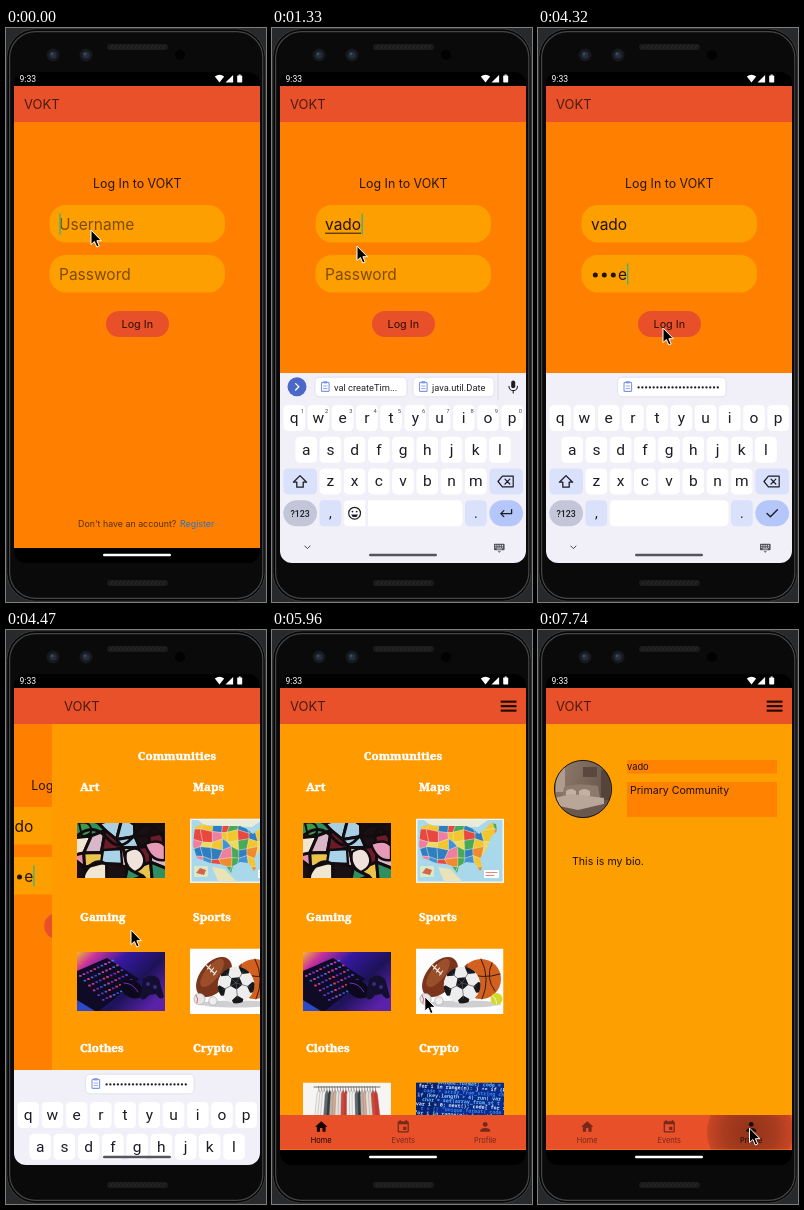
Animation, 260 px wide and 574 px high, one loop 8000 ms. Source, as an HTML page:

```html
<!DOCTYPE html>
<html lang="en">
<head>
<meta charset="utf-8">
<title>Phone app demo</title>
<style>
html, body { margin: 0; width: 100%; height: 100%; overflow: hidden; background: #28292b; }
svg { display: block; width: 260px; height: 574px; }
text { white-space: pre; }
.app { font-family: Inter, sans-serif; }
.key { font-family: Roboto, sans-serif; }
.slab { font-family: "Noto Serif", serif; font-weight: 900; stroke: #fff; stroke-width: .45; }
.mono { font-family: "Noto Sans Mono", monospace; }
</style>
</head>
<body>
<svg id="stage" viewBox="0 0 260 574" xmlns="http://www.w3.org/2000/svg"></svg>
<script>
const APP = 'VOKT', USER = 'vado', PASS = 'vade';
const LOOP = 8000, STEP = 149;

// ---- markup helpers
const rect = (x, y, w, h, fill, r = 0, more = '') =>
  `<rect x="${x}" y="${y}" width="${w}" height="${h}" rx="${r}" fill="${fill}" ${more}/>`;
const circ = (x, y, r, fill, more = '') => `<circle cx="${x}" cy="${y}" r="${r}" fill="${fill}" ${more}/>`;
const path = (d, fill = 'none', more = '') => `<path d="${d}" fill="${fill}" ${more}/>`;
const line = (d, color, w = 1, more = '') =>
  path(d, 'none', `stroke="${color}" stroke-width="${w}" stroke-linecap="round" stroke-linejoin="round" ${more}`);
const text = (x, y, s, size, fill, cls = 'app', more = '') =>
  `<text x="${x}" y="${y}" font-size="${size}" fill="${fill}" class="${cls}" ${more}>${s}</text>`;
const mid = 'text-anchor="middle"';
const group = (id, body, more = '') => `<g id="${id}" ${more}>${body}</g>`;
const clip = (id, shape) => `<clipPath id="${id}">${shape}</clipPath>`;
const times = (n, fn) => Array.from({ length: n }, (_, i) => fn(i)).join('');

function random(seed) {
  return () => (seed = (seed * 16807) % 2147483647) / 2147483647;
}

// Patchwork of skewed cells that share their corners
function patches(x, y, w, h, cols, rows, colors, stroke, width, seed, wobble) {
  const rnd = random(seed), pts = [];
  for (let j = 0; j <= rows; j++) for (let i = 0; i <= cols; i++)
    pts.push([x + w * (i + (rnd() - .5) * wobble) / cols, y + h * (j + (rnd() - .5) * wobble) / rows]);
  const at = (i, j) => pts[j * (cols + 1) + i].map(v => v.toFixed(1)).join(' ');
  return times(cols * rows, k => {
    const i = k % cols, j = k / cols | 0;
    const d = `M${at(i, j)}L${at(i + 1, j)}L${at(i + 1, j + 1)}L${at(i, j + 1)}z`;
    return path(d, colors[Math.floor(rnd() * colors.length)], `stroke="${stroke}" stroke-width="${width}" stroke-linejoin="round"`);
  });
}

// ---- phone body
function phone() {
  const speaker = y => rect(101, y, 61, 6, '#1b1b1b', 3) +
    times(14, i => line(`M${104 + i * 4} ${y + 4.5}l2.5 -3`, '#303030', .8));
  const lens = x => circ(x, 27, 6.5, '#16191d') + circ(x, 27, 3.6, '#252d38') + circ(x - 1, 26, 1.4, '#3d4a5c');
  return rect(0, 0, 260, 574, '#28292b') +
    rect(.8, .8, 258.4, 572.4, '#060606', 29, 'stroke="#3a3b3c" stroke-width="1"') +
    rect(3.6, 3.6, 253.2, 566.8, '#0a0a0a', 26, 'stroke="#454648" stroke-width="1.2"') +
    speaker(16) + speaker(552) + lens(47) + lens(80) + circ(174, 27, 5, '#020202') +
    rect(8, 44, 246, 491, '#000', 12);
}

function statusBar() {
  return text(13.5, 54, '9:33', 8.6, '#fff', 'key') +
    path('M213.5 54.5L208.8 48.6Q213.5 45 218.2 48.6z', '#fff') +
    path('M219.5 54.5h7.6v-7.6z', '#fff') +
    rect(231.2, 47.4, 5, 7.2, '#fff', .8) + rect(232.7, 46.5, 2, 1.2, '#fff');
}

const title = () => text(18, 81, APP, 13, '#4b1b10');

// ---- login screen
function login() {
  const field = y => rect(43.5, y, 175.5, 37.4, '#fe9f00', 16.5);
  return rect(8, 94, 246, 426, '#ff8000') + title() +
    text(131.3, 160.3, 'Log In to ' + APP, 12.4, '#2b1503', 'app', mid) +
    field(177) + field(227) +
    text(53, 202, '', 15.5, '#7d4c00', 'app', 'id="user"') +
    line('M53 205.2h0', '#231500', 1, 'id="under"') +
    group('dots', '') +
    text(53, 252, '', 15.5, '#7d4c00', 'app', 'id="pass"') +
    rect(0, 0, 1.3, 21, '#2fb58a', 0, 'id="caret"') +
    rect(100, 283, 63, 26, '#e8502a', 13) +
    text(131.3, 300, 'Log In', 10.8, '#2d0d04', 'app', mid) +
    text(72, 499.3, "Don't have an account?", 8.85, '#54300a') +
    text(174, 499.3, 'Register', 8.9, '#2a72c4');
}

// ---- keyboard
function keyboard() {
  const ink = '#1c1d24', tint = '#dae1fb';
  const key = (x, y, w, fill = '#fff', r = 4.5) => rect(x, y, w, 26, fill, r);
  const row = (s, x, y) => [...s].map((c, i) => {
    const cx = x + i * 24.22;
    return key(cx - 10.8, y, 21.6) + text(cx, y + 17.8, c, 15.5, ink, 'key', mid);
  }).join('');
  const board = x => rect(x, 354.4, 7.6, 9, '#fff', 1, 'stroke="#7f95e8" stroke-width="1.1"') +
    rect(x + 2, 353.2, 3.6, 2.2, '#7f95e8') + line(`M${x + 2} 358h3.6M${x + 2} 360.5h3.6`, '#7f95e8', .8);
  const chip = (x, w) => rect(x, 349.2, w, 19.6, '#fff', 4.5, 'stroke="#dcdde6" stroke-width=".8"');
  return rect(8, 345, 246, 190, '#f1eff7') +
    group('strip',
      circ(25, 358.8, 9.5, '#4b68c9') + line('M23.6 355.6l3.2 3.2l-3.2 3.2', '#fff', 1.3) +
      chip(43, 92) + board(49.5) + text(62, 362.6, 'val createTim...', 9.3, ink, 'key') +
      chip(141, 81) + board(147.5) + text(160, 362.6, 'java.util.Date', 9.3, ink, 'key') +
      line('M226 346v26', '#d9d8e0', .8) +
      rect(239.2, 352.6, 4, 7.6, ink, 2) + line('M237 358.4a4.2 4.2 0 0 0 8.4 0M241.2 362.6v2.4', ink, 1.1)) +
    group('secret', chip(79.5, 108.5) + board(86) + times(22, i => circ(100.6 + i * 3.77, 359.4, 1.15, ink))) +
    row('qwertyuiop', 22.2, 377) + row('asdfghjkl', 34.2, 408.8) + row('zxcvbnm', 58.4, 440.4) +
    group('digits', times(10, i => text(30.5 + i * 24.22, 384.5, (i + 1) % 10, 5.8, '#45464f', 'key', mid))) +
    key(11.4, 440.4, 33.6, tint) + line('M28 447.6l-6.6 6.6h3.4v5h6.4v-5h3.4z', ink, 1.3) +
    key(217.4, 440.4, 33.6, tint) +
    line('M230.4 448.2h10.8v10.6h-10.8l-4.4 -5.3zM233 451.2l4.8 4.8M237.8 451.2l-4.8 4.8', ink, 1.2) +
    key(11.4, 472.2, 33.6, '#c3c5d8', 13) + text(28.2, 488.6, '?123', 8.8, ink, 'key', mid + ' font-weight="500"') +
    key(47.4, 472.2, 21.8, tint) + text(58.3, 490, ',', 14, ink, 'key', mid) +
    rect(71.8, 472.2, 118.6, 26, '#fff', 4.5) +
    group('smile', rect(93.4, 472, 2.6, 26.4, '#f1eff7') +
      circ(82.6, 485.2, 5.9, 'none', `stroke="${ink}" stroke-width="1.2"`) +
      circ(80.5, 483.6, .9, ink) + circ(84.7, 483.6, .9, ink) + path('M79.2 486.4h6.8a3.5 3.5 0 0 1-6.8 0z', ink)) +
    key(193, 472.2, 21.8, tint) + text(203.9, 490, '.', 14, ink, 'key', mid) +
    key(217.4, 472.2, 33.6, '#b5c6fb', 13) +
    group('enter', line('M239.6 481.6v4h-10.6M231.8 482.6l-3 3l3 3', ink, 1.3)) +
    group('check', line('M229 485.4l3.4 3.4l7 -7', ink, 1.4)) +
    line('M32.8 518l2.6 2.6l2.6 -2.6', '#44454d', 1) +
    rect(222, 515.8, 10.6, 6.4, '#55565e', .8) +
    times(8, i => rect(223.3 + i % 4 * 2.2, 517 + (i >> 2) * 1.7, 1.1, 1, '#f1eff7')) +
    rect(224.6, 520.5, 5.4, .8, '#f1eff7') + path('M225.6 523.2h3.4l-1.7 1.5z', '#55565e');
}

// ---- pictures on the home screen
function art() {
  const colors = ['#e9c34b', '#b52f3a', '#e58fb4', '#a8cfe4', '#f1e6d2', '#2f8f62', '#6b1a2a', '#1a1013', '#d9b7c9', '#1a1013'];
  return rect(31, 193, 88, 55, '#160f12') +
    patches(27, 189, 96, 63, 6, 4, colors, '#120c0f', 3, 77, .8) +
    path('M33 193q10 -2 12 5t-9 8z', '#3f9a4c', 'stroke="#120c0f" stroke-width="2"') +
    path('M57 220l18 -1l1 15l-21 -1z', '#a9d3e8', 'stroke="#120c0f" stroke-width="2.4"') +
    path('M80 222q12 -8 17 3t-8 17q-12 -6 -9 -20z', '#efe3dc', 'stroke="#120c0f" stroke-width="2.4"') +
    path('M99 214q14 -6 20 2v14q-14 2 -20 -16z', '#e79ab8', 'stroke="#120c0f" stroke-width="2.4"') +
    line('M31 206q16 -14 30 2t28 -4t30 6M36 248q10 -22 24 -14', '#120c0f', 3);
}

function map() {
  const colors = ['#e8483f', '#f2c72e', '#4aa957', '#ee7fa0', '#3f93d6', '#f08a2e', '#2f7fc0', '#f0da5a'];
  const land = 'M149 197l9 -3l3 2h33l7 3l6 5l5 -4l7 -7l5 1l1 7l-6 6l-3 8l-3 7l-5 6l2 10l-2 3l-5 -8l-9 -1l-7 4l-2 7l-5 -7l-6 -2l-10 -1l-13 -5l-4 -13z';
  return rect(144, 188.5, 88, 64.5, '#f3f6f5') + rect(145.5, 190, 85, 61.5, '#a9d8ea') +
    path('M152 190h64l-10 7l-48 -2z', '#e9ecd8') + path('M166 237l12 2l12 12h-18z', '#ebe3b8') +
    `<g clip-path="url(#land)">${patches(147, 192, 82, 54, 9, 6, colors, '#f0e6c8', .35, 41, .6)}</g>` +
    clip('land', path(land)) +
    rect(148, 236, 14, 11, '#d9e9c8', 1) + path('M150 243l4 -5l6 2l-2 5z', '#d5654a') +
    rect(212, 240, 15, 8, '#fff') + line('M214 242.5h11M214 245.5h8', '#d4554a', .7);
}

function gaming() {
  const rnd = random(9), neon = ['#e04bd0', '#5a4cf2', '#3f86ff', '#ff4a7a', '#8a38de'];
  return rect(31, 322, 88, 59, 'url(#neon)') +
    path('M31 341l30 -13l32 21l-40 32h-22z', '#0f0a26') +
    times(60, k => {
      const i = k % 10, j = k / 10 | 0;
      return rect((33 + i * 3.6 + j * 4.6).toFixed(1), (345 - i * 1.7 + j * 4.8).toFixed(1), 2.6, 1.8, neon[Math.floor(rnd() * 5)], .5, 'opacity=".8"');
    }) +
    path('M31 370l18 11h-18z', '#2b49c8') +
    `<ellipse cx="86" cy="359" rx="12" ry="8.5" fill="#0c091c" transform="rotate(28 86 359)"/>` +
    line('M78 353q9 0 14 9', '#6b2fc0', 1) +
    path('M97 349q9 -7 16 0l5 18q-4 4 -8 -3l-7 1q-6 8 -9 2z', '#140f30') +
    circ(102, 354, 2, '#3a2b7c') + circ(109, 357, 2, '#3a2b7c');
}

function sports() {
  const spot = (x, y, r, turn) => path(times(5, i => {
    const a = (turn + i * 72) * Math.PI / 180;
    return (i ? 'L' : 'M') + (x + r * Math.cos(a)).toFixed(1) + ' ' + (y + r * Math.sin(a)).toFixed(1);
  }) + 'z', '#17181b');
  return rect(144, 318.5, 87.5, 65.5, '#fdfdfd') +
    `<ellipse cx="191" cy="374" rx="38" ry="3.5" fill="#cfcfd2"/>` +
    circ(209, 349, 20, '#d2601f') + path('M196 333a20 20 0 0 0 -4 27z', '#8f3f14') +
    `<g transform="rotate(-52 168 347)"><ellipse cx="168" cy="347" rx="23" ry="14" fill="#7a351c"/>` +
    `<ellipse cx="170" cy="343" rx="17" ry="7" fill="#9a4f2a"/></g>` +
    line('M160 335l9 9M161.5 339l3 -4M164.5 342l3 -4M167.6 345l3 -4', '#f4ebe2', 1.1) +
    line('M209 329q10 20 1 40M192 342q18 8 36 2M220 333q-7 15 3 28', '#3a1a0b', 1) +
    `<g clip-path="url(#ball)">${circ(190, 355, 18.5, '#ededee')}${spot(190, 353, 6.6, -60)}` +
    times(5, i => {
      const a = (-60 + i * 72) * Math.PI / 180;
      return spot(190 + 17.5 * Math.cos(a), 354 + 17.5 * Math.sin(a), 6, 120 + i * 72) +
        line(`M190 353L${(190 + 14 * Math.cos(a)).toFixed(1)} ${(354 + 14 * Math.sin(a)).toFixed(1)}`, '#55565a', .7);
    }) + `</g>` + clip('ball', circ(190, 355, 18.5, '#000')) +
    circ(153.5, 369, 5.6, '#e6e6e7', 'stroke="#a8a8ab" stroke-width=".7"') + line('M150 365q3 4 1 8', '#d2483f', .8) +
    circ(167, 371, 4.2, '#efeff0', 'stroke="#a8a8ab" stroke-width=".7"') +
    circ(224.5, 369, 6, '#d2d92f') + line('M220.5 366q4 2 4 8', '#f5f6d8', .9);
}

function clothes() {
  const colors = ['#f3f1ee', '#dedad4', '#b9b2a8', '#f5f5f4', '#c8382f', '#e5e2dd', '#3a3a3d', '#efefee', '#cf463c', '#d7a88d', '#5e6b73'];
  return rect(31, 452.5, 88, 64, '#f6f5f4') + line('M42 457h66', '#6f6c6a', 1) +
    times(22, i => {
      const x = 45 + i * 2.7, lean = (i - 11) * .35;
      return line(`M${x + 1.5} 456.5l.6 5`, '#5c5a58', .6) +
        path(`M${x} 464l1.8 -4l2 4l${1 + lean} 40h-5z`, colors[i * 7 % 11], 'stroke="#77726d" stroke-width=".3"');
    });
}

function code() {
  const rows = ['t = [] "Unique.format(', 'for i in range(n): j +=', 'code = array_from_string', 'if (key.length > 4) run(', 'char = set(array_from_st', 'var i = 0; next(); code['];
  return rect(144, 452.5, 88, 64, '#0a2a8c') + rect(144, 452.5, 22, 64, '#061c62', 0, 'opacity=".6"') +
    `<g transform="rotate(3 188 470)">` + times(9, i =>
      text(141 + i * 5 % 11, 455 + i * 4.5, rows[i % 6] + ' ' + rows[(i + 2) % 6], 5, ['#6cc4ff', '#e2f4ff', '#3f8cf0', '#9fdcff'][i % 4], 'mono', 'font-weight="700"')) + `</g>`;
}

// ---- home and profile pages
function cards() {
  const pics = { Art: art, Maps: map, Gaming: gaming, Sports: sports, Clothes: clothes, Crypto: code };
  return Object.keys(pics).map((name, i) => {
    const x = i % 2 ? 144 : 31, row = i >> 1, y = [193, 188.5, 322, 318.5, 452.5, 452.5][i], h = [55, 64.5, 59, 65.5, 64, 64][i];
    return text(x + 3, 160.7 + row * 130.5, name, 11.6, '#fff', 'slab') +
      clip('pic' + i, rect(x, y, i === 3 ? 87.5 : 88, h, '#000')) +
      `<g clip-path="url(#pic${i})">${pics[name]()}</g>`;
  }).join('');
}

function profile() {
  return rect(8, 94, 246, 392, '#fe9f00') +
    clip('face', circ(45, 159, 28.6, '#000')) + `<g clip-path="url(#face)">` +
    rect(16, 130, 58, 58, 'url(#room)') + rect(18, 136, 9, 26, '#b09c8c') +
    rect(45, 137, 14, 10, '#5a483f') + rect(63, 140, 9, 30, '#54443b') +
    path('M26 157q12 -5 34 -1l2 12h-38z', '#8e7a6c') +
    path('M28 161q5 -4 10 0v5h-10zM41 161q5 -4 11 0v5h-11z', '#c2b0a2') +
    path('M16 168l18 -4l32 4v8l-28 6l-22 -6z', '#b8a698') + path('M16 175l24 5l34 -8v20h-58z', '#6a574d') +
    `</g>` + circ(45, 159, 28.6, 'none', 'stroke="#1c130c" stroke-width="1"') +
    rect(89, 130, 150, 13.5, '#ff8200') + text(89, 140, USER, 9.3, '#1d1002') +
    rect(89, 152, 150, 35, '#ff8200') + text(92, 164.4, 'Primary Community', 10.6, '#1d1002') +
    text(34, 235.4, 'This is my bio.', 10.6, '#1d1002');
}

const icons = [
  'M10 20v-6h4v6h5v-8h3L12 3 2 12h3v8z',
  'M17 12h-5v5h5zM16 1v2H8V1H6v2H5c-1.1 0-2 .9-2 2v14c0 1.1.9 2 2 2h14c1.1 0 2-.9 2-2V5c0-1.1-.9-2-2-2h-1V1zM19 19H5V8h14z',
  'M12 12c2.2 0 4-1.8 4-4s-1.8-4-4-4-4 1.8-4 4 1.8 4 4 4zM12 14c-2.7 0-8 1.3-8 4v2h16v-2c0-2.7-5.3-4-8-4z'
];

// The page is drawn wider than the screen on the right, so it covers it while it slides in
function main() {
  const tab = (name, i) => {
    const x = 49.2 + i * 82;
    return group('tab' + i, `<g transform="translate(${x - 7.4} 489.4) scale(.62)"><path fill-rule="evenodd" d="${icons[i]}"/></g>` +
      text(x, 513, name, 7.4, 'currentFill', 'app', mid).replace('fill="currentFill"', ''));
  };
  return rect(6, 94, 248, 426, '#ff9a00') + title() +
    times(3, i => rect(228.7, 70.6 + i * 4.5, 15.8, 2.1, '#1b0a06')) +
    group('home', text(131, 130.3, 'Communities', 11.6, '#fff', 'slab', mid) + cards()) +
    group('profile', profile()) +
    rect(6, 485, 248, 34.6, '#e8502a') + ['Home', 'Events', 'Profile'].map(tab).join('') +
    clip('bar', rect(8, 485, 246, 34.6, '#000')) +
    `<g clip-path="url(#bar)">${circ(212, 502, 0, 'url(#press)', 'id="ripple"')}</g>`;
}

const stage = document.getElementById('stage');
stage.innerHTML = `<defs>
  <linearGradient id="neon" x2="1" y2=".7"><stop stop-color="#f0b43a"/><stop offset=".16" stop-color="#c9329c"/><stop offset=".4" stop-color="#3418a0"/><stop offset=".7" stop-color="#1d1358"/><stop offset="1" stop-color="#5a22a8"/></linearGradient>
  <linearGradient id="room" x2="1" y2=".4"><stop stop-color="#94806f"/><stop offset="1" stop-color="#65544a"/></linearGradient>
  <radialGradient id="press"><stop stop-color="#2a1208" stop-opacity=".46"/><stop offset=".6" stop-color="#2a1208" stop-opacity=".34"/><stop offset="1" stop-color="#2a1208" stop-opacity=".16"/></radialGradient>
  ${clip('screen', rect(8, 44, 246, 491, '#000', 12))}</defs>` +
  phone() + `<g clip-path="url(#screen)">` + statusBar() +
  rect(8, 58, 246, 36, '#e8512a') +
  group('login', login()) + group('main', main()) + group('keys', keyboard()) +
  rect(97, 525.8, 68, 2.5, '#fff', 1.25, 'id="handle"') + `</g>` +
  group('mouse', path('M0 0V14.6L3.4 11.5L5.8 17L8.2 16L5.9 10.7H10.4z', '#000', 'stroke="#fff" stroke-width="1" stroke-linejoin="round"'));

const el = {};
stage.querySelectorAll('[id]').forEach(e => el[e.id] = e);
const set = (id, name, value) => el[id].setAttribute(name, value);
const show = (id, on) => set(id, 'display', on ? 'inline' : 'none');
const move = (id, x, y) => set(id, 'transform', `translate(${x} ${y})`);
const clamp = v => Math.max(0, Math.min(1, v));

// ---- motion, by step n
function mouseAt(n) {
  const down = clamp((n - 8) / 3), toButton = clamp((n - 22) / 6);
  const toTab = 1 - Math.pow(1 - clamp((n - 39) / 6), 2.5), last = clamp((n - 46) / 2);
  const b = toButton * toButton * (3 - 2 * toButton);
  return [85 + 40 * b + 76 * toTab + 10.5 * last,
    202 + 36 * (1 - Math.pow(1 - down, 1.45)) + 62 * b + 182 * toTab + 16 * last];
}

function typing(n) {
  const onPass = n >= 12;
  const user = USER.slice(0, clamp((n - 3) / 4) * 4);
  const count = n < 15 ? 0 : n < 19 ? Math.min(3, n - 14) : 4;
  el.user.textContent = user || 'Username';
  set('user', 'fill', user ? '#231500' : '#7d4c00');
  const wide = user ? el.user.getComputedTextLength() : 0;
  show('under', user && !onPass);
  set('under', 'd', `M53.5 205.2h${Math.max(0, wide - 1)}`);

  const hidden = Math.max(0, count - 1), x = 53 + hidden * 9;
  el.dots.innerHTML = times(hidden, i => circ(57.3 + i * 9, 247, 2.5, '#231500'));
  el.pass.textContent = count ? PASS[count - 1] : 'Password';
  set('pass', 'x', x);
  set('pass', 'fill', count ? '#231500' : '#7d4c00');
  const end = onPass ? (count ? x + el.pass.getComputedTextLength() : 53.4) : 53.4 + wide;
  set('caret', 'x', end);
  set('caret', 'y', onPass ? 235.5 : 185.5);
}

function draw(n) {
  typing(n);

  const inMain = n >= 30, slide = n < 33 ? 40 * Math.pow(.035, n - 30) : 0;
  show('login', n < 31);
  move('login', inMain ? -(246 - slide) * .3 : 0, 0);
  show('main', inMain);
  move('main', inMain ? slide : 0, 0);

  const rise = n < 4 ? 190 * Math.pow(1 - n / 3, 2) : n === 30 ? 95 : 0;
  const open = n > 0 && n < 31, secret = n >= 12;
  show('keys', open);
  move('keys', 0, rise);
  ['strip', 'digits', 'smile', 'enter'].forEach(id => show(id, !secret));
  ['secret', 'check'].forEach(id => show(id, secret));
  set('handle', 'fill', open ? '#55565d' : n === 31 ? '#38383a' : '#fff');

  const onProfile = n >= 52;
  show('home', !onProfile);
  show('profile', onProfile);
  for (let i = 0; i < 3; i++) set('tab' + i, 'fill', i === (onProfile ? 2 : 0) ? '#120503' : '#74291a');
  set('ripple', 'r', 43 * clamp((n - 50) / 2));

  move('mouse', ...mouseAt(n));
}

let shown = -1;
function tick(now) {
  const n = Math.floor((now % LOOP + 15) / STEP);
  if (n !== shown) draw(shown = n);
  requestAnimationFrame(tick);
}
draw(0);
requestAnimationFrame(tick);
</script>
</body>
</html>
```
